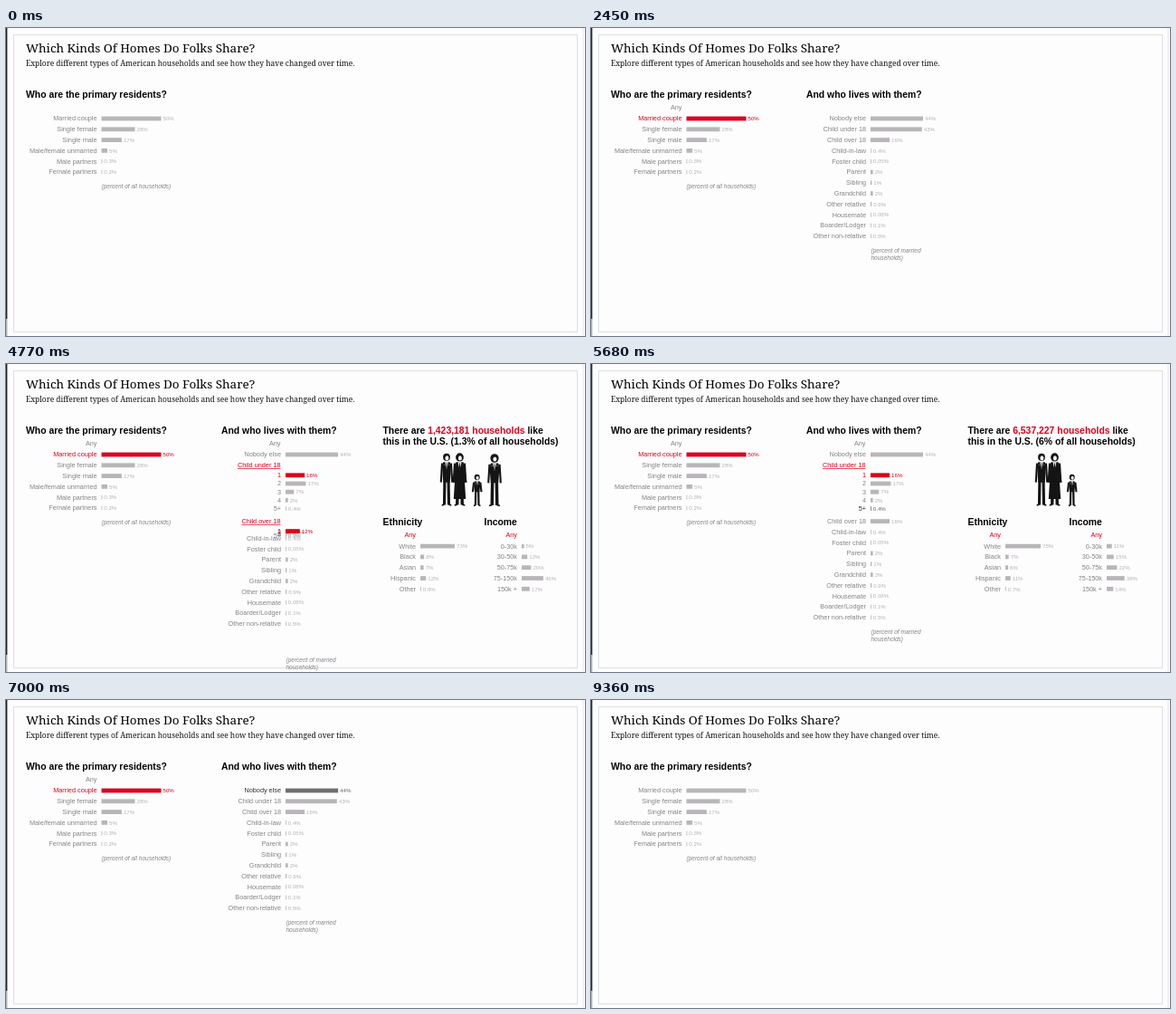
These frames come from a looping animation (640 px wide and 340 px high, 9.55 s). An HTML page with a canvas:

```html
<!DOCTYPE html>
<html lang="en">
<head>
<meta charset="utf-8">
<title>Household explorer</title>
<style>
html, body { margin: 0; width: 100%; height: 100%; overflow: hidden; background: #fefdfe; }
canvas { display: block; }
</style>
</head>
<body>
<canvas id="stage" width="640" height="340"></canvas>
<script>
const ctx = document.getElementById('stage').getContext('2d');
const SANS = '"Liberation Sans", Arial, sans-serif';
const SERIF = '"Noto Serif", Georgia, serif';
const LOOP = 9550, TURN = 4795;
const RED = '#dc001a', GREY = '#858385', PAPER = '#fefdfe', INK = '#141414';
const ROW = 11.8;

// Clicks on the way out; the second half of the loop runs the same way back.
const PICK_COUPLE = 1500, PICK_MINOR = 3290, PICK_ADULT = 4722, OPEN_TIME = 150;

const residents = { 'Married couple': 50, 'Single female': 28, 'Single male': 17,
  'Male/female unmarried': 5, 'Male partners': 0.3, 'Female partners': 0.2 };
const members = { 'Nobody else': 44, 'Child under 18': 43, 'Child over 18': 16,
  'Child-in-law': 0.4, 'Foster child': 0.05, 'Parent': 2, 'Sibling': 1, 'Grandchild': 2,
  'Other relative': 0.9, 'Housemate': 0.08, 'Boarder/Lodger': 0.1, 'Other non-relative': 0.5 };
const counts = ['1', '2', '3', '4', '5+'];
const opening = {
  'Child under 18': { start: PICK_MINOR, share: [16, 17, 7, 2, 0.4] },
  'Child over 18': { start: PICK_ADULT, share: counts.map((_, i) => Math.round(120 / 3.5 ** i) / 10) }
};

// Key points of the unseen pointer: time, x, y.
const pointerPath = [[0, -40, 152.5], [230, 5.5, 152.5], [500, 20, 129.5], [910, 80, 105.5],
  [1500, 80, 100], [2520, 209, 98], [3290, 260, 112], [3909, 290, 162], [3910, 290, 170], [TURN, 290, 174]];

const clamp = x => Math.max(0, Math.min(1, x));
const easeInOut = x => x < 0.5 ? 4 * x ** 3 : 1 - 4 * (1 - x) ** 3;
const easeOut = x => 1 - (1 - x) ** 2.5;

let pointer;
function pointerAt(u) {
  const next = Math.max(1, pointerPath.findIndex(([time]) => time > u));
  const [a, b] = pointerPath.slice(next - 1, next + 1);
  const k = (u - a[0]) / (b[0] - a[0]);
  return { x: a[1] + (b[1] - a[1]) * k, y: a[2] + (b[2] - a[2]) * k };
}

function text(str, x, y, size, color, { style = '', family = SANS, align = 'left' } = {}) {
  ctx.font = `${style} ${size}px ${family}`;
  ctx.textAlign = align;
  ctx.fillStyle = color;
  ctx.fillText(str, x, y);
  return ctx.measureText(str).width;
}

const heading = (str, x, y, color = '#000') => text(str, x, y, 10.4, color, { style: 'bold' });
const note = (str, x, y) => text(str, x, y + 2, 6.53, GREY, { style: 'italic' });
const label = (str, x, y, color) => text(str, x, y + 2.4, 7.3, color, { align: 'right' });

// x is where the bar starts; y is the middle of the row.
function row(name, value, x, y, { scale = 1.32, height = ROW, on = false } = {}) {
  const hover = Math.abs(pointer.x - x) < 100 && Math.abs(pointer.y - y) <= height / 2;
  const [word, bar, num] = on ? [RED, RED, RED]
    : hover ? ['#333', '#716e71', '#666'] : [GREY, '#b9b6b9', '#b5b2b5'];
  label(name, x - 5, y, word);
  const w = Math.max(0.8, value * scale);
  ctx.fillStyle = bar;
  ctx.fillRect(x, y - 2.4, w, 4.8);
  text(value + '%', x + w + 2, y + 2.2, 6.15, num);
}

function openRow(name, x, y) {
  const w = label(name, x, y, RED);
  ctx.fillRect(x - w, y + 3.4, w, 0.7);
}

function oval(x, y, rx, ry, color = INK) {
  ctx.fillStyle = color;
  ctx.beginPath();
  ctx.ellipse(x, y, rx, ry, 0, 0, 7);
  ctx.fill();
}

// A symmetric four-sided piece, half widths a and b at heights y1 and y2.
function taper(y1, a, y2, b, color = INK) {
  ctx.fillStyle = color;
  ctx.beginPath();
  ctx.moveTo(-a, y1);
  ctx.lineTo(a, y1);
  ctx.lineTo(b, y2);
  ctx.lineTo(-b, y2);
  ctx.fill();
}

function limbs(x1, y1, x2, y2, width) {
  ctx.strokeStyle = INK;
  ctx.lineWidth = width;
  for (const side of [-1, 1]) {
    ctx.beginPath();
    ctx.moveTo(side * x1, y1);
    ctx.lineTo(side * x2, y2);
    ctx.stroke();
  }
}

// w is half the shoulder width, r the size of the head.
function person(x, top, h, w, r, { coat = false, hair = 0 } = {}) {
  ctx.save();
  ctx.translate(x, top);
  const neck = 2.2 * r + 0.6, hip = h * 0.55;
  oval(0, r, r + hair, r * 1.05 + hair);
  oval(0.4, r * 1.25, r * 0.5, r * 0.65, PAPER);
  taper(neck, w * 0.7, neck + 3, w);
  taper(neck + 3, w, hip, w * 0.75);
  limbs(w, neck + 1.5, w + 1.2, hip, 2.1);
  if (coat) {
    taper(neck + 3, w, hip, w + 2.5);
    taper(hip - 1, w, h * 0.87, w + 1.2);
  }
  limbs(w * 0.42, hip - 1, w * 0.5, h - 1, w * 0.62);
  limbs(w * 0.5, h - 1.2, w * 1.05, h - 0.6, 1.6);
  taper(neck, w * 0.36, neck + 2.2 * r, 0, PAPER);
  taper(neck + 1, 0.4, neck + 2 * r, 0.6);
  ctx.restore();
}

function page() {
  ctx.fillStyle = PAPER;
  ctx.fillRect(0, 0, 640, 340);
  ctx.fillStyle = '#222';
  ctx.fillRect(0, 0, 1.4, 321);
  ctx.fillStyle = '#aaa';
  ctx.fillRect(0, 321, 1.4, 19);
  ctx.fillStyle = '#e9e6ec';
  ctx.fillRect(637.5, 0, 1, 340);
  ctx.strokeStyle = '#e0dde4';
  ctx.lineWidth = 1;
  ctx.strokeRect(8.5, 7.5, 623, 328);
  text('Which Kinds Of Homes Do Folks Share?', 22, 27, 13.45, '#000', { family: SERIF });
  text('Explore different types of American households and see how they have changed over time.',
    22, 41.6, 8.42, '#111', { family: SERIF });
}

function residentColumn(u) {
  heading('Who are the primary residents?', 22, 77);
  const picked = u >= PICK_COUPLE;
  if (picked) label('Any', 100.5, 88, GREY);
  Object.entries(residents).forEach(([name, value], i) =>
    row(name, value, 105.5, 100 + i * ROW, { on: picked && i === 0 }));
  note('(percent of all households)', 105.5, 175);
}

function memberColumn(u) {
  ctx.globalAlpha = clamp((u - PICK_COUPLE) / 200);
  heading('And who lives with them?', 238, 77);
  if (u >= PICK_MINOR) label('Any', 303.5, 88, GREY);
  let y = 100, noteY = 246;
  for (const [name, value] of Object.entries(members)) {
    const group = opening[name];
    if (group && u >= group.start) {
      const x = clamp((u - group.start) / OPEN_TIME), open = easeInOut(x);
      openRow(name, 303.5, y);
      // Later counts first, so the picked one stays on top.
      for (let i = 4; i >= 0; i--) {
        row(counts[i], group.share[i], 309, y + 11 + i * 9.2 * open, { height: 9.2 * open, on: i === 0 });
      }
      y += 50 * open;
      noteY += 50 * easeOut(x);
    } else {
      row(name, value, 309, y);
    }
    y += ROW;
  }
  note('(percent of married', 309.5, noteY);
  note('households)', 309.5, noteY + 7.6);
  ctx.globalAlpha = 1;
}

function breakdown(title, left, x, names, values) {
  heading(title, left, 178);
  label('Any', x - 5, 189, RED);
  names.split(' ').forEach((name, i) =>
    row(name.replace('+', ' +'), values[i], x, 201.1 + i * ROW, { scale: 0.52 }));
}

function resultColumn(u) {
  const both = u >= PICK_ADULT;
  const [total, part, ethnicity, income] = both
    ? ['1,423,181', '1.3', [73, 8, 7, 12, 0.9], [5, 12, 20, 46, 17]]
    : ['6,537,227', '6', [75, 7, 6, 11, 0.7], [11, 15, 22, 38, 14]];
  ctx.globalAlpha = clamp((u - PICK_MINOR) / OPEN_TIME);
  let x = 416.5;
  x += heading('There are ', x, 77);
  x += heading(total + ' households', x, 77, RED);
  heading(' like', x, 77);
  heading(`this in the U.S. (${part}% of all households)`, 416.5, 89);

  const shift = both ? -11 : 0;
  person(498 + shift, 99, 57.5, 5, 3.9);
  person(512.5 + shift, 99, 57.5, 5.5, 3.9, { coat: true, hair: 0.5 });
  person(531.7 + shift, 122, 35, 3.6, 3);
  if (both) person(540, 100, 57, 5.6, 4, { hair: 0.6 });

  breakdown('Ethnicity', 416.5, 458, 'White Black Asian Hispanic Other', ethnicity);
  breakdown('Income', 528.5, 570, '0-30k 30-50k 50-75k 75-150k 150k+', income);
  ctx.globalAlpha = 1;
}

function draw(now) {
  const t = now % LOOP;
  const u = t < TURN ? t : 2 * TURN - 1 - t;
  pointer = pointerAt(u);
  page();
  residentColumn(u);
  if (u >= PICK_COUPLE) memberColumn(u);
  if (u >= PICK_MINOR) resultColumn(u);
}

const begin = performance.now();
function tick() {
  draw(performance.now() - begin);
  requestAnimationFrame(tick);
}
tick();
</script>
</body>
</html>
```
